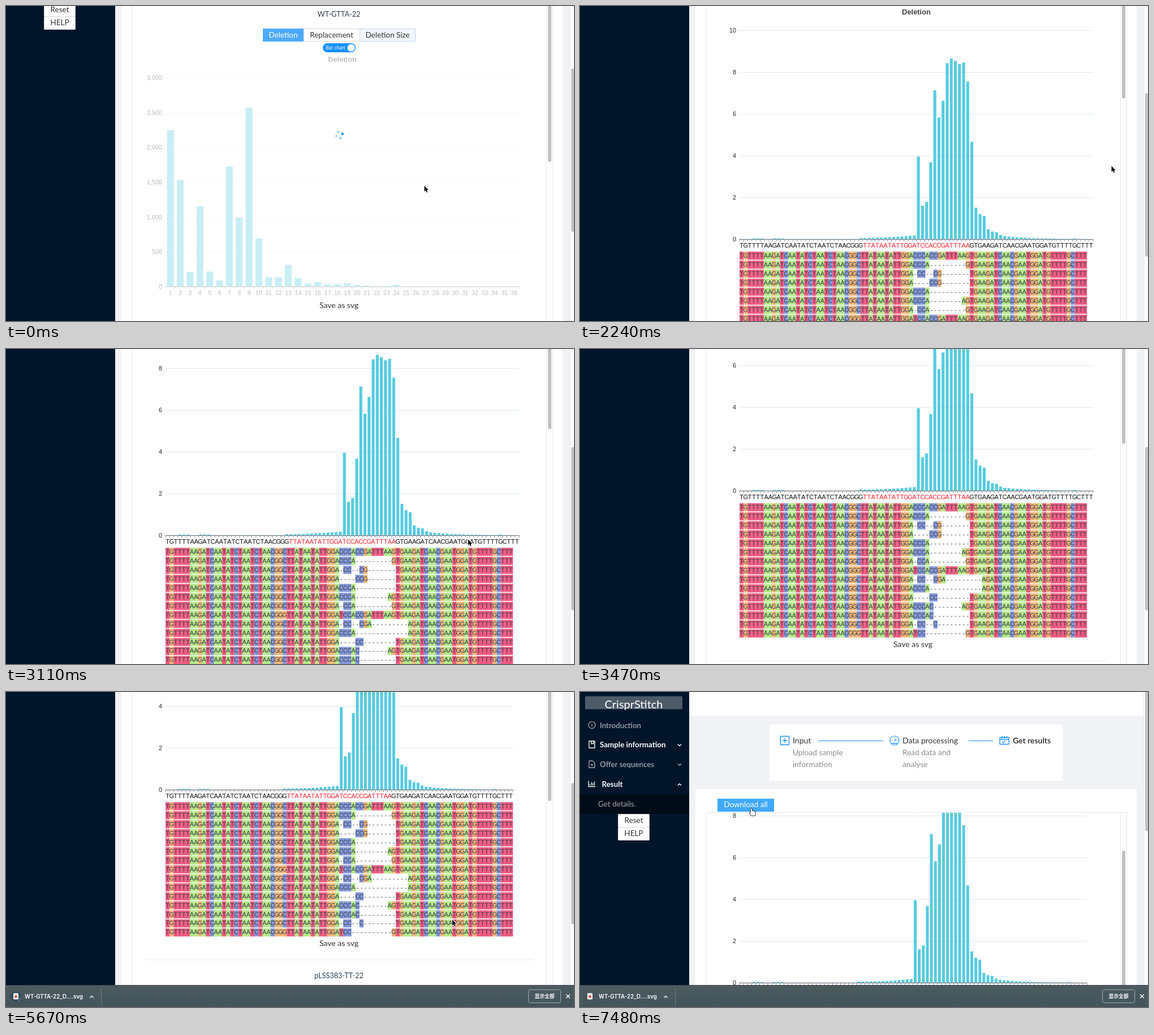
Recreate the animation shown at these times as an HTML page with a canvas. Size 1004 by 558 pixels, loop 8000 ms.

```html
<!DOCTYPE html>
<html lang="en">
<head>
<meta charset="utf-8">
<title>Sequencing results</title>
<style>
  html, body { margin: 0; width: 100%; height: 100%; overflow: hidden; background: #fff; }
  canvas { display: block; width: 1004px; height: 558px; }
</style>
</head>
<body>
<canvas id="stage"></canvas>
<script>
const W = 1004, H = 558, LOOP = 8000;
const canvas = document.getElementById('stage');
const c = canvas.getContext('2d');
const ratio = window.devicePixelRatio || 1;
canvas.width = W * ratio;
canvas.height = H * ratio;

const BLUE = '#1890ff', NAVY = '#001529', CYAN = '#56cbe0';
const LEFT = 282, PLOT_H = 370;

// Sequence data
const REF = 'TGTTTTAAGATCAATATCTAATCTAACGGGTTATAATATTGGATCCACCGATTTAAGTGAAGATCAACGAATGGATGTTTTGCTTT';
const BASE_COLORS = { A: '#b3ea88', T: '#ef5a80', C: '#8297dc', G: '#f3b77b' };
const ROWS = ['CCCACCGATTTAA|GTGA', 'CCCA|GTGA', '-CC--CG|TGA', '----CCG|TGA', 'CCCA|TGA',
  'CCCA|AGTGA', '-CCA|GTGA', 'TCCACCGATTTAA|GTGA', '-CC--CGA|', 'CCCA|', '----CC|TGA',
  'CCCAC|AGTGA', 'CCCAC|TGA', '-CC--C|TGA', 'TCC|GTGA'].map(row => {
  const [start, end] = row.split('|');
  const edited = start[0] === 'T' ? 'G' : 'C';
  return REF.slice(0, 29) + edited + REF.slice(30, 43) + start.padEnd(17 - end.length, '-') + end + REF.slice(60);
});

const PEAK = [3.95, 1.6, 1.78, 3.67, 7.12, 5.82, 6.62, 8.42, 8.64, 8.53, 8.38, 8.45, 7.54, 4.66,
  1.5, 1.2, 1.1, 0.47, 0.36, 0.33, 0.2];
const DELETIONS = [...REF].map((_, i) => {
  if (i === 82) return 0.004774580135359347;
  if ([3, 4, 5, 8, 9, 10, 81].includes(i)) return 0.035;
  if (i < 29) return 0.006;
  if (i < 43) return 0.055 + 0.12 * ((i - 29) / 13) ** 2;
  return PEAK[i - 43] ?? 0.06326318679351128 * Math.exp((69 - i) * 0.16);
});
const SIZES = [2246, 1530, 211, 1152, 217, 90, 1727, 988, 2572, 690, 137, 137, 310, 122, 45, 65, 32, 35,
  47, 25, 15, 8, 8, 25, 5, 4, 3, 2, 4, 2, 4, 2, 2, 2, 2, 2];

// Motion tracks: [time, ...values]
const PAGE = [[1880, 221], [2450, 342], [6130, 342], [6360, 6.5], [6450, 0]];
const INNER = [[2860, 0], [3470, 125], [3530, 125], [3900, 203]];
const POINTER = [[180, 739, 318], [820, 790, 101], [1000, 815, 180], [1250, 900, 260], [1450, 985, 285],
  [1640, 939, 283], [2350, 939, 283], [2650, 881, 299], [2830, 881, 299], [3470, 723, 392], [3530, 723, 392],
  [3990, 597, 449], [5320, 597, 449], [6010, 970, 359], [6450, 970, 359], [6890, 631, 300], [7480, 303, 206]];
// x, y, opacity, pointed plot position
const TOOLTIP = [[360, 735, 400, 0, 745], [500, 745, 410, 1, 760], [820, 760, 418, 1, 787], [880, 760, 418, 1, 787],
  [1120, 640, 260, 1, 850], [1330, 700, 290, 1, 903], [1450, 720, 295, 0, 903], [2480, 730, 305, 0, 900],
  [2640, 714, 313, 1, 881], [2840, 714, 313, 1, 881], [3050, 690, 330, 0, 840]];

const SWAP = 150, RESIZE = 4450;

const clamp = v => Math.max(0, Math.min(1, v));
const smooth = v => { v = clamp(v); return v * v * (3 - 2 * v); };
const ramp = (t, a, b) => smooth((t - a) / (b - a));
function track(t, keys) {
  const next = keys.findIndex(k => k[0] > t);
  if (next === 0) return keys[0].slice(1);
  if (next < 0) return keys[keys.length - 1].slice(1);
  const a = keys[next - 1], b = keys[next], k = ramp(t, a[0], b[0]);
  return a.slice(1).map((v, i) => v + (b[i + 1] - v) * k);
}

// Drawing helpers; text is placed by the middle of its capitals
const SANS = '"Liberation Sans"', UI = 'Lato', SYSTEM = 'Inter, "Noto Sans CJK SC"';
function text(s, x, y, size, color, align = 'left', weight = 400, font = UI) {
  c.font = `${weight} ${size}px ${font}, sans-serif`;
  c.textAlign = align;
  c.fillStyle = color;
  c.fillText(s, x, y + size * 0.36);
}
function rect(x, y, w, h, color) { c.fillStyle = color; c.fillRect(x, y, w, h); }
function round(x, y, w, h, r, fill, stroke) {
  c.beginPath();
  c.roundRect(x, y, w, h, r);
  if (fill) { c.fillStyle = fill; c.fill(); }
  if (stroke) { c.strokeStyle = stroke; c.lineWidth = 1; c.stroke(); }
}
function circle(x, y, r, fill, stroke, width = 1.2) {
  c.beginPath();
  c.arc(x, y, r, 0, 7);
  if (fill) { c.fillStyle = fill; c.fill(); }
  if (stroke) { c.strokeStyle = stroke; c.lineWidth = width; c.stroke(); }
}
function path(d, x, y, stroke, width = 1.3, fill) {
  c.save();
  c.translate(x, y);
  const p = new Path2D(d);
  c.lineWidth = width;
  c.lineJoin = 'round';
  if (stroke) { c.strokeStyle = stroke; c.stroke(p); }
  if (fill) { c.fillStyle = fill; c.fill(p); }
  c.restore();
}
function faded(alpha, draw) {
  if (alpha <= 0) return;
  c.save();
  c.globalAlpha *= alpha;
  draw();
  c.restore();
}

function sampleHeader(name, y, settle) {
  text(name, 588.5, y, 12.7, '#2c3e50', 'center');
  const top = y + 25.5;
  round(454.5, top + .5, 269, 22, 1, '#fff', '#d9d9d9');
  rect(454, top, 72, 23, BLUE);
  faded(1 - settle, () => {
    rect(454, top, 72, 23, 'rgba(255,255,255,.23)');
    round(625.5, top + .5, 98, 22, 1, '#f2f7fe', '#c4d5ea');
  });
  rect(625, top, 1, 23, '#d9d9d9');
  text('Deletion', 490, y + 36.5, 13.5, '#fff', 'center');
  text('Replacement', 575.5, y + 36.5, 13.5, '#333', 'center');
  text('Deletion Size', 674.5, y + 36.5, 13.5, '#333', 'center');
  round(560, y + 51.5, 58, 16, 8, BLUE);
  text('Bar chart', 565, y + 59.5, 8.6, '#fff');
  circle(610, y + 59.5, 6.6, '#fff');
}

function barChart(axis, width, values, max, step, labels, grow) {
  const band = width / values.length;
  for (let v = 0; v <= max; v += step) {
    const y = axis - v / max * PLOT_H;
    if (v) rect(LEFT, Math.round(y), width, 1, '#e0e6f1');
    text(v.toLocaleString('en-US'), 276, y, 10.8, '#222', 'right', 400, SANS);
  }
  values.forEach((v, i) => {
    const h = v / max * PLOT_H * grow;
    rect(LEFT + (i + .15) * band, axis - h, band * .7, h, CYAN);
  });
  rect(LEFT, Math.round(axis), width, 1, '#6e7079');
  for (let i = 0; i <= values.length; i++) rect(LEFT + i * band - .4, axis, .8, 4, '#6e7079');
  labels(band);
}

function sequenceRows(axis) {
  const cell = 614 / 86;
  c.font = `11px ${SANS}, sans-serif`;
  c.textAlign = 'center';
  ROWS.forEach((row, r) => {
    const y = axis + 29.4 + r * 15.96;
    if (y > H + 10) return;
    const baseline = Math.round(y + 3.6);
    [...row].forEach((base, i) => {
      const x = LEFT + i * cell;
      if (base !== '-') rect(x, y - 7.2, cell + .15, 14.4, BASE_COLORS[base]);
      c.fillStyle = '#3c4048';
      c.fillText(base, x + cell / 2, baseline);
    });
  });
}

function spinner(t) {
  [.45, 1, .5, .35].forEach((alpha, i) => {
    const a = i * Math.PI / 2 - 1.95 + t / 1200 * 2 * Math.PI;
    faded(alpha * .8, () => circle(589.3 + 5.8 * Math.cos(a), 228.5 + 5.8 * Math.sin(a), 2.5, BLUE));
  });
}

function results(t, axis, tip) {
  const loading = t < SWAP, settle = ramp(t, 30, 240);
  const focus = .32 + .68 * ramp(t, SWAP, 420);
  const width = t < RESIZE ? 625 : 614;
  sampleHeader('WT-GTTA-22', axis - 482.5, settle);
  faded(focus, () => {
    text('Deletion', 594.5, axis - 403, 12.9, '#404040', 'center', 700, SANS);
    if (loading) {
      barChart(axis, width, SIZES, 3000, 500, band => SIZES.forEach((_, i) =>
        text(i + 1, LEFT + (i + .5) * band, axis + 11, 10.5, '#333', 'center', 400, SANS)), 1);
      return;
    }
    const band = width / 86;
    faded(tip[2], () => rect(LEFT + Math.floor((tip[3] - LEFT) / band) * band, axis - PLOT_H, band, PLOT_H, '#f2f6fb'));
    const grow = 1 - (1 - clamp((t - SWAP) / 600)) ** 3;
    barChart(axis, width, DELETIONS, 10, 2, band => [...REF].forEach((base, i) =>
      text(base, LEFT + (i + .5) * band, axis + 11, 11, i >= 30 && i < 56 ? '#f5222d' : '#111', 'center', 400, SANS)), grow);
  });
  if (loading) {
    text('Save as svg', 588.5, axis + 33, 14, '#333', 'center');
  } else {
    sequenceRows(axis);
    text('Save as svg', 588.5, axis + 272, 14, '#333', 'center');
    rect(248, Math.round(axis + 301), 683, 1, '#e8e8e8');
    sampleHeader('pLSS383-TT-22', axis + 329, 1);
  }
  faded(1 - ramp(t, SWAP, 400), () => spinner(t));
}

function steps(y) {
  rect(335, y - 28.5, 519, 99.5, '#fff');
  path('M-7.5-7.5h15v15h-15zM-4 0h8M0-4v8', 362, y, BLUE);
  text('Input', 376, y, 14, '#333');
  rect(421, y, 115, 1, BLUE);
  circle(556, y, 8, null, BLUE);
  path('M-5 5H5M0 1L3-3M-5 0h1M4 0h1M0-5v1', 556, y, BLUE);
  text('Data processing', 570, y, 14, '#333');
  rect(687, y, 43, 1, BLUE);
  path('M-8-5.5h16v12h-16zM-8-2h16M-4-8v4M0-8v4M4-8v4M-4 2l2 2 4-4', 750, y, BLUE);
  text('Get results', 765, y, 14, '#222', 'left', 600);
  [['Upload sample', 376, 21.5], ['information', 376, 42], ['Read data and', 570, 21.5], ['analyse', 570, 42]]
    .forEach(([s, x, dy]) => text(s, x, y + dy, 13.7, '#8c8c8c'));
}

function sidebar(top) {
  const GREY = '#a0a7af', WHITE = '#fff';
  rect(0, 0, 193, H, NAVY);
  rect(9, top + 7.5, 172, 23, '#4d5b69');
  text('CrisprStitch', 95, top + 21.5, 20, WHITE, 'center');
  circle(21, top + 58.5, 6, null, GREY);
  path('M0-3v1M0-1v4', 21, top + 58.5, GREY);
  path('M-5-6h10v12h-10zM-1-6v5l2-1 2 1v-5', 21, top + 93, WHITE);
  path('M-5-6h6l4 4v8h-10zM-2 1h4M0-1v4', 21, top + 128, GREY);
  path('M-5.5-5v10h12M-3 3v-3M0 3v-6M2.5 3v-4M5 3v-7', 20.5, top + 162.5, WHITE);
  text('Introduction', 35, top + 59, 13.3, GREY, 'left', 600);
  text('Sample information', 35, top + 93.5, 13.4, WHITE, 'left', 700);
  text('Offer sequences', 35, top + 128.5, 13.3, GREY, 'left', 600);
  text('Result', 38.5, top + 163, 13.4, WHITE, 'left', 700);
  path('M-3-1.5L0 1.5 3-1.5', 176, top + 94, WHITE, 1.5);
  path('M-3-1.5L0 1.5 3-1.5', 176, top + 128.5, GREY, 1.5);
  path('M-3 1.5L0-1.5 3 1.5', 176, top + 164, WHITE, 1.5);
  rect(0, top + 181, 193, 35, '#000c17');
  text('Get details.', 32, top + 198, 13.5, GREY);
  ['Reset', 'HELP'].forEach((label, i) => {
    round(67.5, top + 216.5 + i * 23, 55, 23, 1, '#fff', '#d9d9d9');
    text(label, 95, top + 227.5 + i * 23, 13.6, '#333', 'center');
  });
}

function tooltip([x, y, alpha, pointed]) {
  faded(alpha, () => {
    const value = DELETIONS[Math.min(85, Math.floor((pointed - LEFT) / (625 / 86)))];
    const label = `value: ${value}`;
    c.font = `10.5px ${SANS}, sans-serif`;
    const width = c.measureText(label).width + 16;
    c.save();
    c.shadowColor = 'rgba(0,0,0,.2)';
    c.shadowBlur = 8 * ratio;
    c.shadowOffsetX = c.shadowOffsetY = ratio;
    round(x, y, width, 31, 3, '#fff');
    c.restore();
    text(label, x + 8, y + 15.5, 10.5, '#888', 'left', 400, SANS);
  });
}

function downloadBar(t, top) {
  if (top >= H) return;
  const shift = (top - 519) * .62, y = 539 + shift;
  const shade = c.createLinearGradient(0, top, 0, top + 39);
  shade.addColorStop(0, '#4c5c61');
  shade.addColorStop(1, '#43545a');
  rect(0, top, W, 40, shade);
  rect(0, top, W, 1, '#3a484d');
  const [edge] = track(t, [[4510, 10], [4800, 168]]);
  rect(edge, top + 5, 1, 32, '#6c797e');
  c.save();
  c.beginPath();
  c.rect(0, top, edge, 40);
  c.clip();
  if (t < 7000) {
    circle(17.5, y, 9, '#31475b');
    c.beginPath();
    c.arc(17.5, y, 8.5, t / 300, t / 300 + 1.2);
    c.strokeStyle = '#4d83b8';
    c.lineWidth = 1.3;
    c.stroke();
  }
  round(13, y - 5.5, 9, 11, 1, '#fff');
  circle(17.5, y + .5, 2.5, '#d9534a');
  text('WT-GTTA-22_D....svg', 33, y + 1, 9.7, '#fff', 'left', 600, SYSTEM);
  path('M-3.2 1.6L0-1.6 3.2 1.6', 151.5, y + 1, '#fff', 1.4);
  c.restore();
  round(923.5, y - 11.5, 57, 23, 3, null, '#a3adb1');
  text('显示全部', 952, y, 8.8, '#fff', 'center', 600, '"Noto Sans CJK SC", "Noto Sans CJK"');
  path('M-3.3-3.3L3.3 3.3M3.3-3.3L-3.3 3.3', 993.5, y, '#fff', 1.5);
}

function downloadNotice(t) {
  const k = (t - 4350) / 600;
  if (k > 0 && k < 1) {
    faded(Math.min(1, Math.sin(k * Math.PI) * 1.4), () => {
      const y = 470 + 94 * k;
      circle(23, y, 26, 'rgba(208,213,222,.88)');
      path('M-2.5-8h5v7h4.5L0 6.5-7-1h4.5zM-11 16h22v3h-22z', 23, y - 2, null, 1, '#1c5bcb');
    });
  }
  faded(ramp(t, 4180, 4280) * (1 - ramp(t, 5000, 5140)), () => {
    c.save();
    c.shadowColor = 'rgba(0,0,0,.35)';
    c.shadowBlur = 3 * ratio;
    round(-4, 504, 336, 15, 2, '#363d42');
    c.restore();
    text('blob:http://127.0.0.1:8080/7bce36ec-2aa1-4eaa-947c-a800b89599eb', 0, 511.5, 8.6, '#f2f2f2', 'left', 600, SYSTEM);
  });
}

function pointer(t) {
  const [x, y] = track(t, POINTER);
  if ((t > 3900 && t < 5400) || t > 7380) {
    path('M-1 1Q0-1 1 1V5Q3 4 3.5 5.5 5 5 5.5 6 7 5.5 7 7.5V10L6 13H0L-3.5 8Q-3 6.5-1 8.5z', x, y, '#111', 1.5, '#fff');
  } else if (t > 3150 && t < 3850) {
    path('M-2.5-5.5Q0-5.5 0-4Q0-5.5 2.5-5.5M0-4V4M-2.5 5.5Q0 5.5 0 4Q0 5.5 2.5 5.5M-1.5 1.5h3', x, y, '#222', 1);
  } else {
    path('M.5.5V10.8L2.8 8.6 4.5 12.3 6.2 11.5 4.6 7.9H7.9z', x, y, '#fff', 2, '#000');
  }
}

function draw(t) {
  const [scroll] = track(t, PAGE), [inner] = track(t, INNER), tip = track(t, TOOLTIP);
  const top = -scroll, box = top + 213, axis = box + 505 - inner;
  const view = H - 39 * ramp(t, 4425, 4640);

  rect(0, 0, W, H, '#f0f2f5');
  rect(193, top, 804, 42, '#fff');
  steps(top + 86);
  rect(204, top + 172, 780, 900, '#fff');
  rect(243, top + 189, 100, 23, BLUE);
  faded(ramp(t, 7300, 7440), () => rect(243, top + 189, 100, 23, '#40a9ff'));
  text('Download all', 293, top + 199.5, 13.5, '#fff', 'center');

  c.save();
  c.beginPath();
  c.rect(222, box, 745, 900);
  c.clip();
  results(t, axis, tip);
  rect(955, box, 11, 900, '#fdfdfd');
  rect(955, box, 1, 900, '#ebebeb');
  const thumbTop = box + 2 + inner * .325, thumbLength = t < SWAP ? 282 : 254;
  round(958, thumbTop, 6, thumbLength, 3, '#c1c1c1');
  c.restore();
  round(222.5, box + .5, 744, 900, 2, null, '#e6e6e6');

  rect(997, 0, 7, H, '#fafafa');
  rect(996, 0, 1, H, '#e8e8e8');
  round(999, scroll * view / 1077 - 3.5, 6, view * view / 1077, 3, '#c1c1c1');
  sidebar(top);
  tooltip(tip);
  downloadBar(t, view);
  downloadNotice(t);
  pointer(t);
}

const start = performance.now();
function frame() {
  c.setTransform(ratio, 0, 0, ratio, 0, 0);
  draw((performance.now() - start) % LOOP);
  requestAnimationFrame(frame);
}
frame();
</script>
</body>
</html>
```
